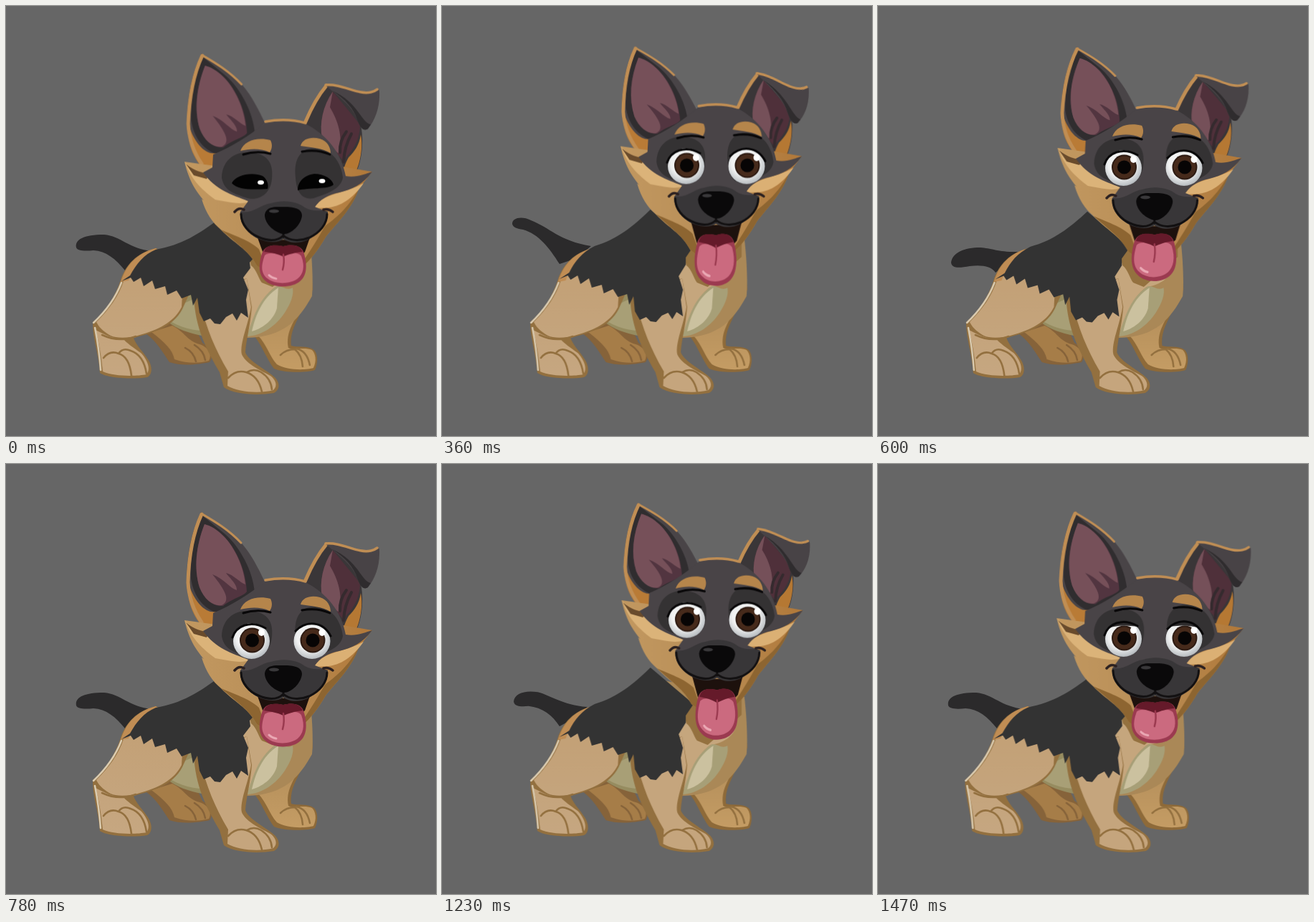
Animation of 600x600 px, one loop 1.5 s. Source, as an HTML page:

```html
<!DOCTYPE html>
<html lang="en">
<head>
<meta charset="utf-8">
<title>Puppy</title>
<style>
html, body { margin: 0; width: 100%; height: 100%; overflow: hidden; background: #666; }
svg { display: block; width: 100vw; height: 100vh; }

.line { fill: none; stroke-linecap: round; stroke-linejoin: round; }
.rim { stroke: #c08e54; }
.fold { stroke: #93703f; stroke-width: 2.6; }
.ink { stroke: #080708; stroke-width: 3; }

/* The bob is lowest 30 ms into each cycle. */
.bob, .body, .saddle, .lift { animation: 750ms cubic-bezier(.37, 0, .63, 1) -720ms infinite; }
.turn, .ear, .ear2, .flap, .jaw, .tongue, .glance { animation: 750ms linear infinite; }

.bob { animation-name: bob; }
@keyframes bob { 62.7% { transform: translateY(-28px); } }

.lift { animation-name: lift; }
@keyframes lift { 62.7% { transform: translateY(-1.5px); } }

.glance { animation-name: glance; }
@keyframes glance {
  4%, 80% { transform: none; }
  36%, 48% { transform: translateX(-2px); }
}

.body { transform-origin: 280px 0; animation-name: squeeze; }
@keyframes squeeze { 45%, 70% { transform: scaleX(.986); } }

.saddle { animation-name: saddle; }
@keyframes saddle {
  40%, 66% { d: path("M176 372 C184 356 194 344 212 335 C245 325 266 308 291 284 L352 335 L341 351 L341 361 L331 377 L337 396 L334 410 L337 433 L328 427 L322 437 L316 428 L307 432 L299 441 L291 440 L285 434 L276 438 L269 426 L267 405 L261 417 L258 402 L245 406 L238 395 L225 401 L222 389 L208 393 L204 380 L192 388 L188 376 L178 382 L174 376 L162 381 Z"); }
}

.tail { animation: tail 750ms ease-in-out infinite; }
@keyframes tail {
  48% { d: path("M98 304 C98 295 112 293 124 299 C150 309 164 328 208 335 L188 352 L164 360 C150 338 135 318 113 312 C105 311 99 309 98 304 Z"); }
  80% { d: path("M102 358 C104 344 120 337 143 337 C158 338 170 344 198 343 L188 354 L164 372 C158 363 145 361 128 363 C112 366 103 366 102 358 Z"); }
  4%, 33%, 97% { d: path("M98 337 C96 326 108 319 137 319 C160 321 172 339 204 342 L190 354 L166 369 C153 353 140 342 122 341 C110 342 100 342 98 337 Z"); }
}

.turn { transform-origin: 250px 0; animation-name: turn; }
@keyframes turn {
  0%, 4%, 100% { transform: none; }
  36% { transform: scaleX(.967); }
  48% { transform: scaleX(.966); }
  64% { transform: translateX(1.5px) scaleX(.966); }
  80% { transform: translateX(1.5px) scaleX(.98); }
}

.ear, .ear2 { transform-origin: 272px 235px; }
.ear { animation-name: ear; }
@keyframes ear {
  0%, 100% { transform: scaleY(1) skewX(-.3deg); }
  4% { transform: scaleY(1) skewX(0deg); }
  36% { transform: scaleY(.952) skewX(1deg); }
  48% { transform: scaleY(.93) skewX(.8deg); }
  64% { transform: scaleY(.91) skewX(-.2deg); }
  80% { transform: scaleY(.94) skewX(-1.4deg); }
  96% { transform: scaleY(.99) skewX(-.7deg); }
}
.ear2 { animation-name: ear2; }
@keyframes ear2 {
  0%, 4%, 100% { transform: scaleY(1); }
  36% { transform: scaleY(.968); }
  64% { transform: scaleY(.938); }
  80% { transform: scaleY(.952); }
}
.flap { transform-origin: 447px 112px; animation-name: flap; }
@keyframes flap {
  0%, 4%, 100% { transform: skewY(0deg); }
  36% { transform: skewY(10deg); }
  48% { transform: skewY(11deg); }
  64% { transform: skewY(9.5deg); }
  80% { transform: skewY(4.5deg); }
}

.jaw { transform-origin: 386px 324px; animation-name: jaw; }
@keyframes jaw {
  0%, 4%, 100% { transform: none; }
  36%, 64% { transform: scaleY(1.3); }
  80% { transform: scaleY(1.12); }
}
.tongue { transform-origin: 386px 335px; animation-name: tongue; }
@keyframes tongue {
  0%, 100% { transform: translateY(0) scale(1, .96); }
  4% { transform: translateY(0) scale(1); }
  36% { transform: translateY(5px) scale(.94, 1.18); }
  48% { transform: translateY(6px) scale(.93, 1.21); }
  64% { transform: translateY(7px) scale(.94, 1.19); }
  80% { transform: translateY(3px) scale(.98, 1.11); }
  96% { transform: translateY(0) scale(1, .97); }
}

/* Blink: shut for 120 ms, with one half-lidded step on each side. */
.open, .shut, .lid { animation: 1500ms step-end infinite; }
.open { animation-name: open; }
.shut { animation-name: shut; }
.lid { animation-name: lid; }
@keyframes open { 0% { opacity: 0; } 8%, 100% { opacity: 1; } }
@keyframes shut { 0% { opacity: 1; } 8%, 100% { opacity: 0; } }
@keyframes lid {
  0% { transform: translateY(10px); }
  10% { transform: none; }
  97.9%, 100% { transform: translateY(9px); }
}
</style>
</head>
<body>
<svg viewBox="0 0 600 600" preserveAspectRatio="none">
  <defs>
    <linearGradient id="fur" x1="250" x2="500" y1="0" y2="0" gradientUnits="userSpaceOnUse">
      <stop offset="0" stop-color="#c29860"/><stop offset=".5" stop-color="#b98f58"/><stop offset="1" stop-color="#b27a3b"/>
    </linearGradient>
    <linearGradient id="haunch" x1="0" x2="0" y1="385" y2="520" gradientUnits="userSpaceOnUse">
      <stop offset="0" stop-color="#c3a177"/><stop offset="1" stop-color="#c6a781"/>
    </linearGradient>
    <linearGradient id="far" x1="0" x2="0" y1="400" y2="505" gradientUnits="userSpaceOnUse">
      <stop offset="0" stop-color="#b08b58"/><stop offset="1" stop-color="#c49c64"/>
    </linearGradient>
    <radialGradient id="ball" cx=".45" cy=".4" r=".6">
      <stop offset=".6" stop-color="#f1f2f2"/><stop offset="1" stop-color="#b9bec2"/>
    </radialGradient>
    <clipPath id="round"><ellipse rx="26" ry="25.5"/></clipPath>
    <g id="eye">
      <ellipse rx="25.5" ry="25" fill="url(#ball)"/>
      <circle cx="1" cy="-1" r="17.5" fill="#2c1a12"/>
      <circle cx="1" cy="-1" r="15.5" fill="#462a1b"/>
      <circle cx="1" cy="-1" r="9.5" fill="#070505"/>
      <ellipse cx="14" cy="-12" rx="4.5" ry="5" fill="#fff"/>
    </g>
  </defs>

  <path class="tail" d="M98 337 C96 326 108 319 137 319 C160 321 172 339 204 342 L190 354 L166 369 C153 353 140 342 122 341 C110 342 100 342 98 337 Z" fill="#2b2a2b"/>

  <g class="body">
    <!-- far legs -->
    <path d="M195 457 C210 468 218 482 228 497 C245 503 270 500 284 497 C290 490 286 477 274 470 L262 444 L232 428 Z" fill="#86633a"/>
    <path d="M203 455 C222 470 232 479 235 493 C255 500 272 498 283 495 C288 487 283 476 270 472 C252 467 250 455 232 446 Z" fill="#a67d48"/>
    <path class="line" d="M250 477 Q262 483 265 496 M263 473 Q276 481 278 494" stroke="#86633a" stroke-width="2.5"/>
    <path d="M340 452 C358 473 362 490 374 506 C390 513 424 511 431 508 C436 498 435 485 430 480 C420 473 406 477 398 474 C396 455 405 442 410 430 L428 396 L424 340 L340 380 Z" fill="#8e6a39"/>
    <path d="M352 460 C364 473 368 489 378 500 C392 509 420 508 429 505 C434 495 432 485 427 480 C416 475 402 481 394 477 C390 455 402 442 407 428 L426 400 L424 340 L350 380 Z" fill="url(#far)"/>
    <path class="line fold" d="M383 487 Q391 479 403 479 Q413 487 414 503 M405 478 Q420 481 424 501"/>
    <!-- belly and chest -->
    <path d="M215 430 C235 455 275 466 335 463 L340 400 L260 395 Z" fill="#968c60"/>
    <path d="M215 430 C235 447 260 454 280 453 L270 405 Z" fill="#a89f76"/>
    <path d="M300 300 L424 325 C427 350 429 385 427 405 C410 435 390 462 336 463 L318 400 Z" fill="#aa8857"/>
    <path d="M318 330 L412 355 C415 382 390 390 376 392 C350 410 350 440 332 465 L314 400 Z" fill="#c5a67d"/>
    <path d="M378 391 C351 408 345 437 336 461 C358 460 377 446 389 428 C398 414 402 402 400 393 C392 398 386 390 378 391 Z" fill="#a79f77"/>
    <path d="M380 393 C357 408 348 432 343 454 C361 449 374 436 378 422 Z" fill="#cbc19f"/>
    <!-- rump and near hind leg -->
    <path d="M209 338 C183 344 167 361 160 382 C153 404 141 424 121 441 C121 465 129 483 131 512 C142 520 180 521 197 518 C205 514 204 502 198 493 C191 482 181 473 178 463 C205 456 232 449 246 423 L270 370 Z" fill="#93703f"/>
    <path d="M209 340 C187 350 172 366 164 384 C157 405 144 423 126 441 C131 451 139 456 146 460 C155 464 171 464 190 458 C218 450 236 438 245 420 L248 370 Z" fill="url(#haunch)"/>
    <path d="M125 452 C130 470 133 490 135 510 C150 517 182 517 196 514 C203 506 196 492 188 484 C178 477 168 470 165 466 C149 464 138 459 125 452 Z" fill="url(#haunch)"/>
    <path class="line" d="M161 386 C153 407 140 425 122 442 M124 449 Q130 480 132 508" stroke="#dacbb0" stroke-width="2.5"/>
    <path d="M209 338 C182 345 167 362 160 385 L171 383 C178 364 190 350 212 340 Z" fill="#c08d54"/>
    <path class="line fold" d="M136 491 Q145 480 157 485 Q172 489 175 516 M157 485 Q163 476 174 481 Q192 487 196 513 M134 459 Q158 470 181 461"/>
    <!-- near front leg -->
    <path d="M262 405 C264 450 280 480 298 511 L304 532 C318 542 350 544 374 540 C383 535 382 526 376 519 C365 508 338 496 334 483 C335 466 341 446 343 420 L336 380 Z" fill="#93703f"/>
    <path d="M271 415 C280 450 291 478 310 510 L309 530 C324 539 354 541 373 536 C380 530 376 521 369 516 C352 507 334 498 329 486 C326 470 338 445 342 420 L336 380 Z" fill="#c5a57d"/>
    <path class="line fold" d="M310 519 Q321 507 335 511 Q352 516 357 538 M336 511 Q346 505 356 511 Q370 520 371 535"/>
    <path d="M335 335 L342 362 C350 368 352 380 357 386 L372 392 L420 350 L420 320 Z" fill="#94713f"/>
    <path class="saddle" d="M173 376 C182 360 192 347 209 340 C245 334 270 318 297 298 L352 345 L340 358 L341 366 L331 379 L338 396 L335 410 L338 435 L328 428 L322 439 L316 429 L307 434 L299 444 L291 443 L285 436 L276 440 L270 428 L267 407 L261 418 L258 403 L245 408 L238 397 L225 403 L222 391 L208 395 L204 383 L192 391 L188 379 L178 385 L174 379 L161 384 Z" fill="#333"/>
  </g>

  <g class="bob">
    <g class="turn">
      <g class="ear">
        <path d="M272 67 C258 95 252 130 252 165 C253 195 265 217 282 236 L300 225 L361 164 C352 145 342 126 330 112 C312 92 290 79 272 67 Z" fill="#494447"/>
        <path d="M274 72 C262 98 257 130 258 160 C262 185 275 200 292 207 C312 198 333 190 347 179 C345 150 326 115 306 98 Z" fill="#302d2f"/>
        <path d="M277 84 C265 115 262 145 270 172 C277 190 290 199 303 198 C316 187 331 185 336 178 C335 150 322 118 303 100 C294 91 285 86 277 84 Z" fill="#523540"/>
        <path d="M277 84 C265 115 262 145 270 172 C277 190 290 199 301 197 C314 191 306 176 288 154 C304 160 312 173 322 176 C323 168 311 158 307 152 C317 154 327 166 334 168 C332 145 320 117 303 100 C294 91 285 86 277 84 Z" fill="#765059"/>
        <path d="M254 165 C261 187 272 202 285 206 L297 207 L291 222 L282 236 C263 216 252 196 254 165 Z" fill="#b97b36"/>
        <path class="line rim" d="M273 70 C260 98 255 130 254 165 C255 188 262 205 273 221" stroke-width="5"/>
        <path class="line rim" d="M274 70 C291 80 310 91 328 110" stroke-width="3"/>
      </g>
      <g class="ear2">
        <path d="M416 165 C428 140 437 122 447 111 C470 113 488 140 496 172 C500 200 493 230 484 240 L468 244 L430 200 Z" fill="#3a3638"/>
        <path d="M495 180 C499 200 493 226 484 240 L469 241 C470 229 474 219 478 212 C486 204 493 195 495 180 Z" fill="#b57833"/>
        <path d="M456 120 C442 140 437 165 441 185 C447 200 462 205 470 216 C482 205 494 190 494 166 Z" fill="#4f303a"/>
        <path d="M456 120 C442 140 437 165 441 185 C447 198 458 203 464 206 C471 184 463 160 452 142 Z" fill="#755059"/>
        <path class="line" d="M471 218 Q472 197 482 179 M466 205 Q465 189 475 176" stroke="#352a2e" stroke-width="4"/>
        <path class="line rim" d="M418 162 C426 143 437 124 447 112" stroke-width="5"/>
        <g class="flap">
          <path d="M445 111 C470 108 490 124 508 121 C516 119 521 114 521 120 C522 142 515 160 505 172 C498 177 493 168 490 159 C484 143 470 131 445 111 Z" fill="#484346"/>
          <path d="M455 119 C473 130 486 145 490 159 C493 168 498 177 505 172 L509 166 C496 164 491 134 455 119 Z" fill="#2f2c2e"/>
          <path class="line rim" d="M446 111 C470 109 490 125 509 121 Q514 120 518 117" stroke-width="3.5"/>
        </g>
      </g>

      <!-- cheeks -->
      <path d="M249 218 C256 247 266 260 276 272 L273 270 C279 290 288 303 300 313 C318 332 337 339 350 363 L366 374 L402 374 C422 360 436 341 446 323 C463 302 484 282 492 256 L511 232 L470 225 L300 225 Z" fill="url(#fur)"/>
      <path d="M350 363 C340 344 322 332 300 313 C316 320 341 328 353 340 L366 374 Z M402 374 C420 350 430 334 445 308 C458 298 476 285 492 256 C484 282 463 302 446 323 C436 341 422 360 402 374 Z" fill="#8d6531"/>
      <path d="M250 219 C262 232 275 234 288 237 L312 258 L339 274 C325 279 307 273 292 271 C275 258 260 246 250 219 Z" fill="#dbb379"/>
      <path d="M430 283 C442 261 470 264 499 248 C488 264 471 280 450 282 Z" fill="#dbb074"/>
      <path d="M251 221 C263 231 274 234 284 234 L280 242 L262 237 Z" fill="#694b2c"/>

      <!-- mask and muzzle -->
      <path d="M275 233 L288 226 L289 208 C315 197 341 181 361 164 C382 159 402 160 418 165 C447 180 468 205 474 238 C488 241 501 235 511 232 C498 250 482 257 465 261 C449 264 438 271 431 281 L449 288 C450 307 432 321 421 327 C406 334 393 330 387 326 C375 334 354 329 342 319 C330 309 326 299 327 288 L338 273 C315 264 293 258 275 233 Z" fill="#494447"/>
      <path class="line rim" d="M362 162 C382 158.500 402 159.500 418 164" stroke-width="3.500"/>
      <path d="M301 240 C302 215 320 203 342 205 C362 207 374 217 371 242 C369 265 350 274 334 268 C317 262 304 258 301 240 Z M404 240 C401 216 410 199 431 199 C455 199 468 220 470 240 C467 258 445 263 429 269 C412 272 405 258 404 240 Z" fill="#343233"/>
      <path class="jaw" d="M351 324 C358 328 410 328 424 324 L417 344 C405 355 368 355 359 346 Z" fill="#1d110d"/>
      <path d="M327 288 C345 291 354 278 370 276 C390 270 408 275 417 282 C428 289 440 284 449 288 C450 307 432 321 421 327 C406 334 393 330 387 326 C375 334 354 329 342 319 C330 309 326 299 327 288 Z" fill="#383638"/>
      <path class="line" d="M328 291 C328 306 340 318 352 323 C366 329 379 329 387 321 C396 329 411 329 423 324 C438 317 448 305 448 291 M387 318 V323" stroke="#121011" stroke-width="3"/>
      <path class="line" d="M319 288 Q325 281 332 285 M443 285 Q450 283 456 288" stroke="#2b2020" stroke-width="3.5"/>
      <path d="M361 292 C363 279 378 281 388 281 C401 281 413 283 413 293 C412 306 398 319 388 319 C377 318 361 306 361 292 Z" fill="#0a090a"/>
      <ellipse cx="374" cy="287" rx="7" ry="2.5" fill="#39383a"/>

      <g class="tongue">
        <path d="M357 347 C361 333 375 334 387 336 C400 333 413 334 416 347 C421 365 419 379 411 386 C400 397 374 397 363 387 C352 378 352 364 357 347 Z" fill="#9b3a50"/>
        <path d="M361 349 C367 344 378 346 387 349 C397 345 407 344 412 350 C418 366 414 377 407 383 C397 391 376 392 365 383 C354 374 357 361 361 349 Z" fill="#cb6a7f"/>
        <path d="M360 344 C363 333 377 334 387 336 C399 333 410 334 414 344 C404 345 394 348 387 351 C379 347 369 345 360 344 Z" fill="#651a2a"/>
        <path class="line" d="M387 348 Q389 359 386 370" stroke="#9b3a50" stroke-width="2.5"/>
        <path class="line" d="M367 378 Q371 382 377 383" stroke="#eba9b5" stroke-width="3"/>
      </g>

      <!-- brows -->
      <g class="lift">
        <path d="M327 203 C332 188 352 183 369 188 C373 196 370 202 368 205 C354 199 341 200 327 203 Z M411 196 C414 185 427 183 438 186 C449 189 453 199 453 206 C441 199 425 198 411 196 Z" fill="#b5854b"/>
        <path class="line ink" d="M331 208 Q350 202 369 207 M413 204 Q434 200 452 208"/>
      </g>
    </g>

    <g class="lift">
      <g class="open glance-box">
        <g class="glance">
          <use href="#eye" x="342.5" y="247"/>
          <use href="#eye" x="427" y="247"/>
          <g transform="translate(342.5 247)" clip-path="url(#round)">
            <path class="lid" d="M-30 -60 H30 V-24 Q0 -32 -30 -22 Z" fill="#2e2c2d"/>
          </g>
          <g transform="translate(427 247)" clip-path="url(#round)">
            <path class="lid" d="M-30 -60 H30 V-22 Q0 -32 -30 -24 Z" fill="#2e2c2d"/>
          </g>
          <path class="line ink" d="M316 242 C321 226 341 217 362 229 M404 233 C419 218 442 219 453 240"/>
        </g>
      </g>
      <g class="shut">
        <path d="M315 248 C321 236 344 232 358 238 C364 242 367 250 365 256 C345 257 324 258 315 248 Z M407 258 C407 246 416 237 430 235 C444 235 455 242 457 250 C450 257 422 254 407 258 Z" fill="#030303"/>
        <ellipse cx="355.5" cy="247" rx="4.5" ry="3" fill="#fff"/>
        <ellipse cx="441" cy="245" rx="4.5" ry="3" fill="#fff"/>
      </g>
    </g>
  </g>
</svg>
</body>
</html>
```
